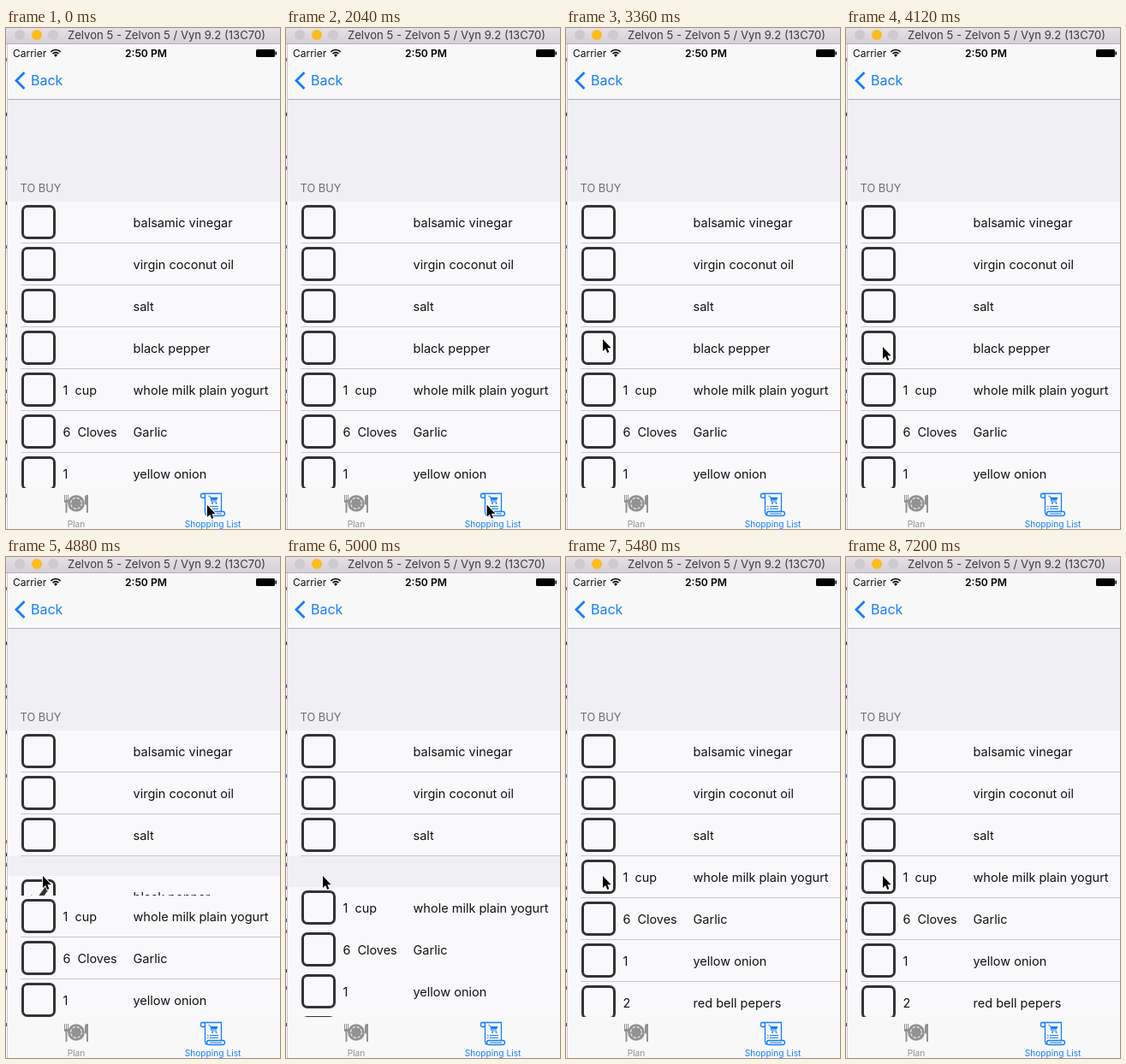
Animation of 320x586 px, one loop 8000 ms. Source, as an HTML page with a canvas:

```html
<!DOCTYPE html>
<html lang="en">
<head>
<meta charset="utf-8">
<title>Shopping list</title>
<style>
html, body { margin: 0; width: 100%; height: 100%; overflow: hidden; background: #efeff4; }
canvas { display: block; width: 320px; height: 586px; }
</style>
</head>
<body>
<canvas id="stage" width="320" height="586"></canvas>
<script>
const c = document.getElementById('stage').getContext('2d');
const LOOP = 8000, ROW = 49, LIST_TOP = 203, TAB_TOP = 538, GONE = 3;
const BLUE = '#157efb', GRAY = '#929292', CELL = '#f9f8fb', BACK = '#efeff4';
const items = [
  ['', 'balsamic vinegar'], ['', 'virgin coconut oil'], ['', 'salt'], ['', 'black pepper'],
  ['1  cup', 'whole milk plain yogurt'], ['6  Cloves', 'Garlic'],
  ['1', 'yellow onion'], ['2', 'red bell pepers'], ['', '']
];

// Progress from 0 to 1 between two times, eased at both ends
function ease(t, from, to) {
  const u = Math.min(1, Math.max(0, (t - from) / (to - from)));
  return u * u * (3 - 2 * u);
}

function rect(x, y, w, h, color) {
  c.fillStyle = color;
  c.fillRect(x, y, w, h);
}

function text(str, x, y, size, color, align = 'left', weight = 400) {
  c.font = `${weight} ${size}px Inter, "Liberation Sans", sans-serif`;
  c.textAlign = align;
  c.fillStyle = color;
  c.fillText(str, x, y);
}

function dot(x, y, r, color) {
  c.fillStyle = color;
  c.beginPath();
  c.arc(x, y, r, 0, 7);
  c.fill();
}

function line(points, color, width) {
  c.strokeStyle = color;
  c.lineWidth = width;
  c.beginPath();
  points.forEach(([x, y]) => c.lineTo(x, y));
  c.stroke();
}

function roundBox(x, y, w, h, r) {
  c.beginPath();
  c.roundRect(x, y, w, h, r);
}

function drawRow(i, top, checked, ruled) {
  const [amount, name] = items[i], mid = top + 24;
  rect(2, top, 318, ROW, CELL);
  roundBox(19.5, mid - 18.5, 37, 37, 5.5);
  c.strokeStyle = '#333336';
  c.lineWidth = 3;
  c.stroke();
  if (checked) line([[28, mid], [35, mid + 8], [48, mid - 10]], '#333336', 5);
  text(amount, 66.5, mid + 5.5, 14.4, '#111');
  text(name, 148.5, mid + 5.5, 14.5, '#111');
  if (ruled) rect(17, top + 48, 303, 1, '#c8c7cc');
}

function drawList(t) {
  const up = Math.floor(ROW * ease(t, 4790, 5390));
  const down = Math.round(ROW * ease(t, 4740, 5030));
  const ruled = t < 5000 || t >= 5400;
  const top = i => LIST_TOP + ROW * i;
  rect(2, 84, 318, 502, BACK);
  text('TO BUY', 16.5, 192, 12.8, '#6d6d72');
  if (t < 5030) drawRow(GONE, top(GONE) + down, t >= 4720, t < 4740);
  items.forEach((_, i) => {
    if (i < GONE) drawRow(i, top(i), false, true);
    if (i > GONE) drawRow(i, top(i) - up, false, ruled);
  });
}

function drawEditorEdge() {
  rect(0, 18, 2, 568, '#fff');
  const tints = ['#b5483f', '#333', '#7a35b0', '#7a35b0', '#333', '#4a4fd0'];
  [35, 99, 149, 162, 203, 254, 331, 346, 358, 385, 398, 423, 436, 482, 502, 545]
    .forEach((y, i) => rect(0, y, 1, 4, tints[i % tints.length]));
  rect(1, 18, 1, 568, '#c9c9cc');
}

function drawTitleBar() {
  const g = c.createLinearGradient(0, 0, 0, 18);
  g.addColorStop(0, '#e5e1e6');
  g.addColorStop(1, '#d4d0d5');
  rect(0, 0, 320, 18, g);
  rect(0, 18, 320, 1, '#b6b3b7');
  dot(16, 8, 6, '#cdc9ce');
  dot(36, 8, 6, '#fdbc1a');
  dot(55, 8, 6, '#cdc9ce');
  text('Zelvon 5 - Zelvon 5 / Vyn 9.2 (13C70)', 187.5, 13, 13.1, '#3c3a3d', 'center');
}

function drawNavBar() {
  rect(2, 19, 318, 64, '#f8f8f8');
  rect(2, 83, 318, 1, '#b2b2b2');
  text('Carrier', 8, 33.5, 12, '#111');
  text('2:50 PM', 163.5, 33.5, 12.2, '#000', 'center', 600);
  c.strokeStyle = '#000';
  c.lineWidth = 1.7;
  for (const r of [4.8, 8]) {
    c.beginPath();
    c.arc(58, 33.5, r, -Math.PI * 0.75, -Math.PI * 0.25);
    c.stroke();
  }
  c.fillStyle = '#000';
  c.beginPath();
  c.moveTo(58, 34);
  c.arc(58, 33.5, 2.8, -Math.PI * 0.75, -Math.PI * 0.25);
  c.fill();
  roundBox(292, 25, 22, 9, 1.5);
  c.fill();
  rect(314.5, 27.5, 1.5, 4, '#000');
  line([[21.5, 52], [12, 61.5], [21.5, 71]], BLUE, 2.8);
  text('Back', 29, 67, 16, BLUE);
}

function drawPlate() {
  for (const x of [68.5, 70.5, 72.5]) rect(x - 0.5, 546, 1, 7, GRAY);
  rect(68, 552, 5, 3, GRAY);
  rect(69.5, 554, 2, 13, GRAY);
  dot(82, 556, 9.8, GRAY);
  c.strokeStyle = '#f8f8f8';
  c.lineWidth = 1.1;
  c.setLineDash([3.2, 1.8]);
  c.beginPath();
  c.arc(82, 556, 6.4, 0, 2 * Math.PI);
  c.stroke();
  c.setLineDash([]);
  roundBox(92, 546, 4, 12, [3, 0, 0, 2]);
  c.fillStyle = GRAY;
  c.fill();
  rect(94, 557, 2, 10, GRAY);
}

function drawScroll() {
  c.strokeStyle = BLUE;
  c.lineWidth = 1.3;
  roundBox(227.5, 544.5, 5, 5, 2);
  c.stroke();
  line([[230, 544.5], [251.5, 544.5], [251.5, 565.5]], BLUE, 1.3);
  line([[232.5, 548], [232.5, 567], [234, 570.5]], BLUE, 1.3);
  roundBox(234.5, 565.5, 21, 5, 2.5);
  c.stroke();
  line([[236.5, 547.5], [238.5, 548], [240, 554], [246, 554]], BLUE, 1);
  c.fillStyle = BLUE;
  c.beginPath();
  c.moveTo(239, 549);
  c.lineTo(247.5, 549);
  c.lineTo(246, 552.5);
  c.lineTo(240, 552.5);
  c.fill();
  dot(241, 556, 1, BLUE);
  dot(245.5, 556, 1, BLUE);
  for (const y of [559, 562]) {
    rect(235, y, 1.5, 1, BLUE);
    rect(238, y, 10, 1, BLUE);
  }
  rect(238, 567.5, 14, 1, BLUE);
}

function drawTabBar() {
  rect(2, TAB_TOP, 318, 586 - TAB_TOP, '#f8f8f8');
  drawPlate();
  drawScroll();
  text('Plan', 82, 583.5, 10.2, GRAY, 'center');
  text('Shopping List', 241.5, 583.5, 10.2, BLUE, 'center');
}

function drawPointer(t) {
  const go = ease(t, 2020, 2840);
  const x = 235 - 192 * go;
  const y = 558 - 157 * go - 37 * ease(t, 2860, 3360) + 9 * ease(t, 3540, 4120);
  const shape = [[0, 0], [0, 14], [3.2, 11], [5.3, 16], [7.4, 15.1], [5.3, 10.2], [9.7, 10.2]];
  c.beginPath();
  shape.forEach(([dx, dy]) => c.lineTo(x + dx, y + dy));
  c.closePath();
  c.strokeStyle = '#fff';
  c.lineWidth = 1.8;
  c.stroke();
  c.fillStyle = '#000';
  c.fill();
}

function draw(t) {
  drawList(t);
  drawEditorEdge();
  drawTitleBar();
  drawNavBar();
  drawTabBar();
  drawPointer(t);
}

const start = performance.now();
function tick() {
  draw((performance.now() - start) % LOOP);
  requestAnimationFrame(tick);
}
tick();
</script>
</body>
</html>
```
